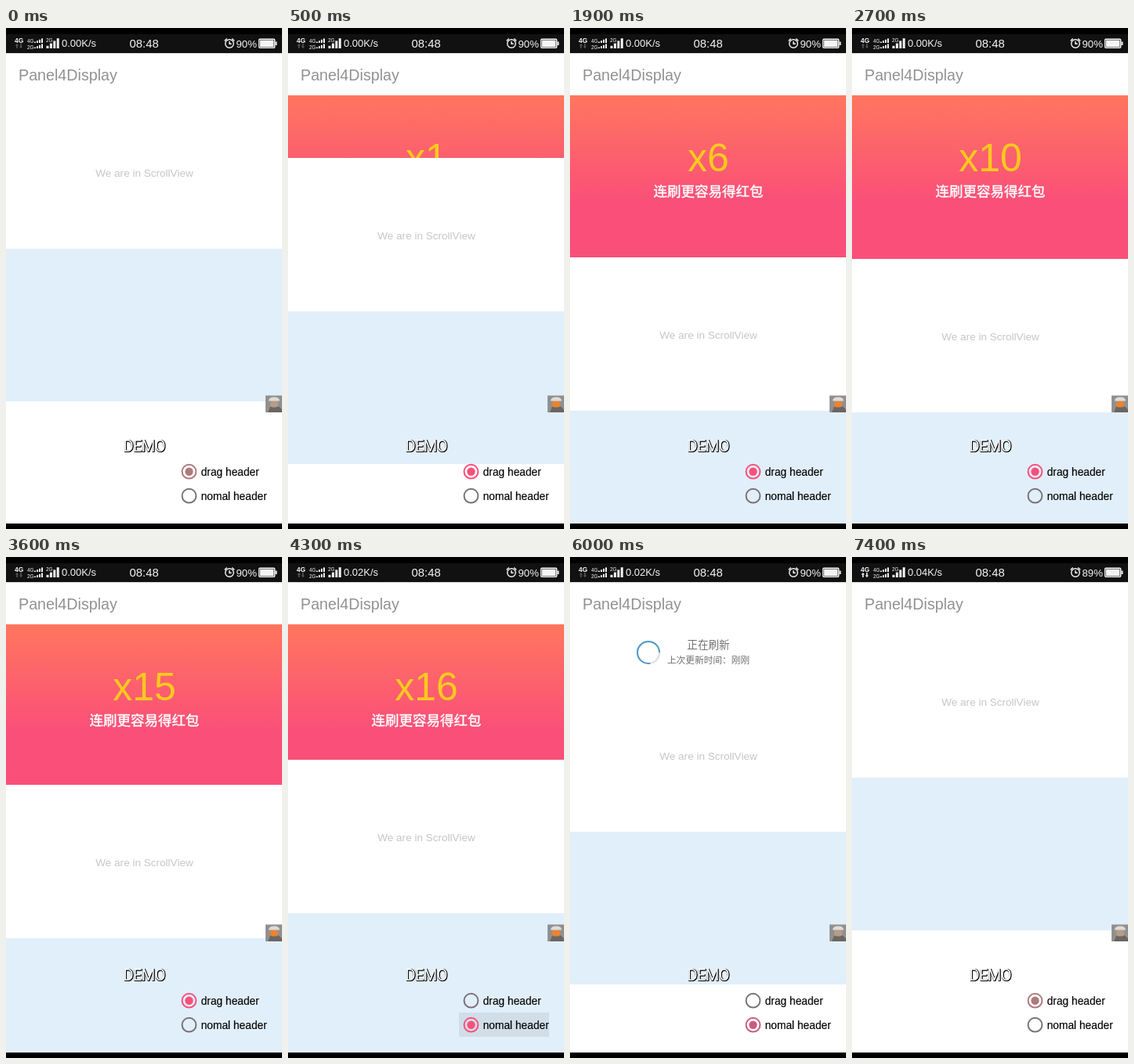
An HTML page that plays this animation: 352x640 px, repeating every 7.5 s.

```html
<!DOCTYPE html>
<html lang="en">
<head>
<meta charset="utf-8">
<title>Pull to refresh</title>
<style>
  html, body { margin: 0; width: 100%; height: 100%; overflow: hidden; background: #fff; }
  svg { display: block; width: 352px; height: 640px; font-family: "Liberation Sans", Arial, sans-serif; }
  .mid { text-anchor: middle; }
  .cjk { font-family: "Noto Sans CJK SC", "Noto Sans CJK", "Noto Sans CJK JP", sans-serif; text-anchor: middle; }
  .label { font-size: 13.75px; fill: #000; stroke: #000; stroke-width: .15; }
  .demo { font: 20px Roboto, sans-serif; letter-spacing: -.6px; fill: #fff; text-shadow: 1px 1px 0 #000, 1px 0 0 #000, 0 1px 0 #000; }
  .tiny { font-size: 6.5px; }
  .ring { fill: none; stroke-width: 2; }
</style>
</head>
<body>
<svg viewBox="0 0 352 640">
  <defs>
    <linearGradient id="warm" gradientUnits="userSpaceOnUse" x1="0" y1="86" x2="0" y2="224">
      <stop offset="0" stop-color="#ff765e"/>
      <stop offset="1" stop-color="#fa4f79"/>
    </linearGradient>
  </defs>
  <rect width="352" height="640" fill="#fff"/>

  <g id="gift">
    <rect y="86" width="352" height="230" fill="url(#warm)"/>
    <text id="count" class="mid" x="176.5" y="183" font-size="50" fill="#fcc91e"></text>
    <text class="cjk" x="176.5" y="215" font-size="17.5" fill="#fff" stroke="#fff" stroke-width=".4">连刷更容易得红包</text>
  </g>

  <g id="page">
    <rect y="86" width="352" height="560" fill="#fff"/>
    <text class="mid" x="176.5" y="189.5" font-size="13.55" fill="#c6c6c6">We are in ScrollView</text>
    <rect y="282" width="352" height="195" fill="#e1effa"/>
  </g>

  <g id="plain">
    <path id="arrow" d="M100 38 L110 49.5 H105 V56 H95 V49.5 H90Z M95 58h10v4h-10z M95 64.5h10v2h-10z" fill="#aaabad"/>
    <g id="spinner" fill="none" stroke-width="2">
      <circle cx="100" cy="53" r="14" stroke="#d9dde2"/>
      <path d="M102.4 66.8 A14 14 0 1 1 114 53" stroke="#539ac8"/>
    </g>
    <text id="state" class="cjk" x="176.5" y="47.5" font-size="13.6" fill="#707070"></text>
    <text class="cjk" x="176.5" y="67" font-size="11.7" fill="#707070">上次更新时间：刚刚</text>
  </g>

  <rect y="32" width="352" height="54" fill="#fff"/>
  <rect y="32" width="352" height="1" fill="#e6dfe2"/>
  <text x="16" y="67" font-size="19.7" fill="#929292">Panel4Display</text>

  <rect width="352" height="32" fill="#111"/>
  <rect width="352" height="8" fill="#000"/>
  <g fill="#f4f4f4">
    <text x="11" y="19" font-size="8.5" font-weight="bold">4G</text>
    <path id="net" d="M14 20l2.3 2.5h-1.5v3.5h-1.6v-3.5h-1.5z M19 26l-2.3-2.5h1.5v-3.5h1.6v3.5h1.5z"/>
    <text class="tiny" x="27" y="19">4G</text>
    <text class="tiny" x="27" y="26.5">2G</text>
    <text class="tiny" x="51" y="18">2G</text>
    <g id="bars"></g>
    <text id="speed" x="71" y="24.2" font-size="13"></text>
    <text x="157.5" y="25" font-size="14.9">08:48</text>
    <text id="charge" x="293.5" y="24.5" font-size="13.2"></text>
    <g fill="none" stroke="#f4f4f4" stroke-width="1.4">
      <circle cx="285" cy="20" r="5.3"/>
      <path d="M285 17v3.3h2.7 M278.7 16.5l3-3 M291.3 16.5l-3-3"/>
      <rect x="322.7" y="14.2" width="20" height="11" rx="1"/>
    </g>
    <rect x="324" y="15.5" width="17.5" height="8.5"/>
    <rect x="343.5" y="17.5" width="2" height="4.5"/>
  </g>

  <g transform="translate(331 469.5)">
    <rect width="21" height="21.5" fill="#91908f"/>
    <path d="M3 21.5 L6 14 H17 L21 18 V21.5Z" fill="#6b6662"/>
    <rect id="face" x="6" y="7" width="10" height="8" rx="3"/>
    <path d="M4 7 Q4 2 11 2 T18 7Z" fill="#dedbd6"/>
  </g>

  <rect id="press" x="218" width="115" height="31" fill="#000" opacity=".07"/>
  <g id="radios"></g>
  <text class="demo" x="149.5" y="541">DEMO</text>
  <rect y="633" width="352" height="7" fill="#000"/>
</svg>
<script>
const LOOP = 7500, STEP = 100, HOLD = 173;
const $ = id => document.getElementById(id);
const set = (el, attrs) => { for (const k in attrs) el.setAttribute(k, attrs[k]); };
const show = (el, on) => set(el, { display: on ? 'inline' : 'none' });

function add(parent, tag, attrs, text) {
  const el = document.createElementNS('http://www.w3.org/2000/svg', tag);
  set(el, attrs);
  if (text) el.textContent = text;
  return parent.appendChild(el);
}

// Signal strength: x, baseline, bar width, pitch, rise
for (const [x, y, w, pitch, rise] of [[36, 19, 2, 3, 1.4], [36, 26, 2, 3, 1.4], [51.5, 26, 3, 4.4, 3.2]])
  for (let i = 0; i < 4; i++) {
    const h = rise * (i + 1);
    add($('bars'), 'rect', { x: x + i * pitch, y: y - h, width: w, height: h });
  }

const radios = [['drag header', 567], ['nomal header', 598]].map(([label, cy]) => {
  const at = { cx: 233.5, cy: cy - 0.3 };
  add($('radios'), 'text', { class: 'label', x: 248.7, y: cy + 4.7 }, label);
  return {
    ring: add($('radios'), 'circle', { ...at, r: 8.9, class: 'ring' }),
    dot: add($('radios'), 'circle', { ...at, r: 5.2 })
  };
});

// Pull distance as [time, px]
const before = [[200, 0], [500, 80], [800, 192], [900, 202]];
const after = [[3900, HOLD], [4300, HOLD], [4400, 95], [4500, 28], [4600, 0], [4700, 0],
  [4800, 52], [4900, 90], [5000, 103], [5200, 108], [5300, 84], [5400, 68.5], [6500, 68.5],
  [6600, 36], [6700, 11], [6800, 0]];

function track(points, t) {
  if (t <= points[0][0]) return points[0][1];
  for (let i = 1; i < points.length; i++) {
    const [t0, v0] = points[i - 1], [t1, v1] = points[i];
    if (t <= t1) return v0 + (v1 - v0) * (t - t0) / (t1 - t0);
  }
  return points[points.length - 1][1];
}

function pull(t) {
  if (t < 900) return track(before, t);
  if (t >= 3900) return track(after, t);
  // repeated short tugs beyond the resting height
  return 193 + 20 * Math.cos(1.1 + 2 * Math.PI * (t - 1200) / 189.3);
}

function draw(t) {
  const d = Math.round(pull(t));
  const gift = t < 4600, red = gift && d > 0;
  const chosen = t >= 4300 && t < 7200 ? 1 : 0;
  const accent = red ? '#fa4f7a' : chosen ? '#c95c82' : '#af7a7b';

  set($('page'), { transform: `translate(0 ${d})` });
  set($('plain'), { transform: `translate(0 ${d})` });
  show($('gift'), red);
  show($('plain'), !gift && d > 0);
  $('count').textContent = 'x' + Math.max(1, Math.min(16, 2 + Math.floor((t - 1100) / 190)));

  const released = t >= 5300, ready = d > 68;
  show($('arrow'), !released);
  show($('spinner'), released);
  set($('arrow'), { transform: `rotate(${ready ? 0 : 180} 100 52.5)` });
  set($('spinner'), { transform: `rotate(${(t - 6000) * 0.36} 100 53)` });
  $('state').textContent = released ? '正在刷新' : ready ? '松开刷新数据' : '下拉刷新数据';

  radios.forEach(({ ring, dot }, i) => {
    const on = i === chosen;
    set(ring, { stroke: on ? accent : '#7b7276' });
    set(dot, { fill: accent });
    show(dot, on);
  });
  set($('press'), { y: chosen ? 582 : 551 });
  show($('press'), (t >= 4300 && t < 4500) || (t >= 7200 && t < 7300));

  const active = (t >= 4700 && t < 5700) || t >= 7000;
  set($('net'), { fill: active ? '#f4f4f4' : '#555' });
  $('speed').textContent = (t < 4100 ? '0.00' : t < 6800 ? '0.02' : '0.04') + 'K/s';
  $('charge').textContent = t < 6800 ? '90%' : '89%';
  set($('face'), { fill: red ? '#e88432' : '#b79b86' });
}

const start = performance.now();
function tick(now) {
  const t = Math.max(0, now - start) % LOOP;
  draw(Math.floor(t / STEP) * STEP);
  requestAnimationFrame(tick);
}
draw(0);
requestAnimationFrame(tick);
</script>
</body>
</html>
```
